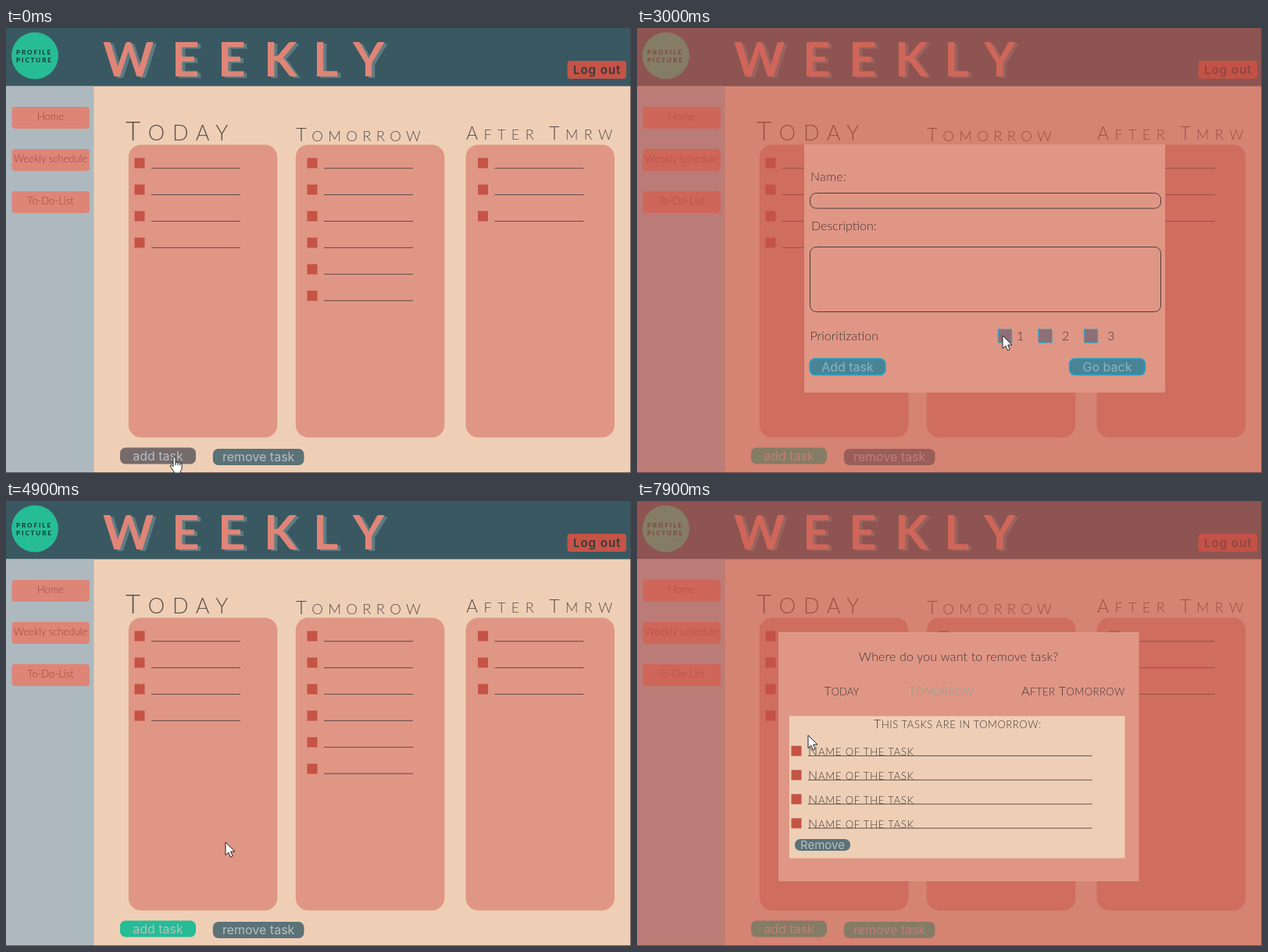
An HTML page that plays this animation: 800 px wide and 570 px high, repeating every 8 s.

```html
<!DOCTYPE html>
<html lang="en">
<head>
<meta charset="utf-8">
<title>Weekly planner</title>
<style>
  html, body { margin: 0; width: 100%; height: 100%; overflow: hidden; }
  svg { display: block; width: 100vw; height: 100vh; }
  text { font-family: Lato, "Open Sans", sans-serif; font-weight: 300; white-space: pre; }
  .ui { font-family: Inter, "Noto Sans", sans-serif; font-weight: 400; }
</style>
</head>
<body>
<svg id="stage" viewBox="0 0 800 570"></svg>
<script>
const LOOP = 8000;
const C = {
  header: '#3a5862', side: '#adb9be', peach: '#eecfb6', card: '#e09685', nav: '#dd8678',
  red: '#c55346', teal: '#5b7277', green: '#26bc95', ink: '#433a38', title: '#5d504b'
};

const attrs = o => Object.entries(o).map(([k, v]) => `${k}="${v}"`).join(' ');
const rect = (x, y, width, height, fill, more = {}) =>
  `<rect ${attrs({ x, y, width, height, fill, ...more })}/>`;
const text = (x, y, size, str, more = {}) =>
  `<text ${attrs({ x, y, 'font-size': size, fill: C.ink, ...more })}>${str}</text>`;
const line = (x1, x2, y) =>
  `<path d="M${x1} ${y}H${x2}" stroke="#4d4340" stroke-width=".9"/>`;
const square = (x, y, s = 13) => rect(x, y, s, s, C.red);

// Words starting with a capital get a large first letter, the rest are small capitals.
function caps(x, y, big, small, str, more = {}) {
  const body = str.replace(/([A-Z]?)([^A-Z]*)/g, (_, a, b) =>
    (a && `<tspan font-size="${big}">${a}</tspan>`) + b.toUpperCase());
  return text(x, y, small, body, more);
}

function button(id, x, y, w, h, label, size = 16) {
  return rect(x, y, w, h, C.teal, { id, rx: 7 }) +
    text(x + w / 2, y + h / 2 + size * .36, size, label,
      { class: 'ui', fill: '#b5bfc3', 'text-anchor': 'middle' });
}

function header() {
  const word = (dx, dy, fill) => text([124, 212, 271, 330, 393, 444].map(v => v + dx).join(' '),
    62 + dy, 62, 'WEEKLY', { fill, style: 'font-weight:700' });
  const badge = (y, s) => text(13, y, 8, s,
    { fill: '#19463f', style: 'font-weight:900', 'letter-spacing': 1.9 });
  return rect(0, 0, 800, 74.5, C.header) +
    `<circle cx="37" cy="35.5" r="30" fill="${C.green}"/>` +
    badge(33.5, 'PROFILE') + badge(43.5, 'PICTURE') +
    word(4, 2, '#5f7c83') + word(0, 0, '#df8577') +
    rect(718.5, 42, 75.5, 23, C.red, { rx: 4 }) +
    text(726, 58.5, 15, 'Log out',
      { class: 'ui', fill: '#38393f', style: 'font-weight:600', 'letter-spacing': 1 });
}

function sidebar() {
  return rect(0, 74.5, 112.5, 495.5, C.side) + ['Home', 'Weekly schedule', 'To-Do-List'].map((s, i) =>
    rect(7.5, 101 + 54 * i, 99.5, 28, C.nav, { rx: 4 }) +
    text(57, 118 + 54 * i, 13, s, { fill: '#9c443b', 'text-anchor': 'middle' })).join('');
}

function column(x, boxX, rows) {
  let out = rect(x, 149.5, 190.5, 375, C.card, { rx: 16 });
  for (let i = 0; i < rows; i++) {
    out += square(boxX, 166.5 + 34 * i) + line(boxX + 21.5, boxX + 135.5, 179.7 + 33.9 * i);
  }
  return out;
}

function page() {
  const title = (x, y, big, small, str, spacing) =>
    caps(x, y, big, small, str, { fill: C.title, 'letter-spacing': spacing });
  return rect(0, 0, 800, 570, C.peach) + header() + sidebar() +
    column(156.8, 164.5, 4) + column(370.8, 385.5, 6) + column(588.5, 604, 3) +
    title(153, 143.5, 33, 27, 'Today', 9.7) +
    title(371, 144.5, 24, 18.5, 'Tomorrow', 6.3) +
    title(589, 142.5, 23, 18, 'After Tmrw', 7.4) +
    button('add', 146, 537.5, 97, 21, 'add task') +
    button('remove', 264.8, 539, 116.7, 21, 'remove task');
}

function addDialog() {
  const field = (y, h) => rect(221.5, y, 449, h, 'none', { rx: 8, stroke: '#4a3f3d' });
  const boxes = [462.5, 514, 572.5];
  const glow = (x, y, w, h, more) => rect(x, y, w, h, '#29a5d2',
    { 'fill-opacity': .35, stroke: '#1fa6d0', 'stroke-width': 1.5, ...more });
  return rect(214, 149, 462, 318, C.card) +
    text(222, 196, 16, 'Name:', { 'letter-spacing': .3 }) + field(211.5, 19.5) +
    text(223, 259, 16, 'Description:') + field(280.5, 83) +
    text(221.5, 400, 16, 'Prioritization') +
    boxes.map((x, i) => square(x, 386, 17) + text([486, 544, 602][i], 400, 16, i + 1)).join('') +
    `<path id="check" d="M465 395l4 4.5l8-8.5" fill="none" stroke="#f3dcc4" stroke-width="2.6"/>` +
    button('confirm', 221, 423.5, 97, 21, 'Add task') +
    button('back', 553.5, 423.5, 97, 21, 'Go back') +
    `<g id="glow">${boxes.map(x => glow(x, 386, 17, 17, { 'stroke-dasharray': '2 1' })).join('')}` +
    glow(221, 423.5, 97, 21, { rx: 7 }) + glow(553.5, 423.5, 97, 21, { rx: 7 }) + '</g>';
}

function removeDialog() {
  let rows = '';
  for (let i = 0; i < 4; i++) {
    const y = 326 + 30.9 * i;
    rows += square(197.5, y - 12.4) + line(219, 582.5, y + .4) +
      caps(219, y, 16, 13, 'Name of the task', { 'letter-spacing': .85 });
  }
  return rect(181, 168, 461.5, 319, C.card) +
    text(411.5, 205, 16, 'Where do you want to remove task?',
      { 'text-anchor': 'middle', 'letter-spacing': .17 }) +
    caps(239.5, 249, 16, 13, 'Today') +
    caps(347.5, 249, 16, 13, 'Tomorrow', { id: 'pick', 'letter-spacing': .3 }) +
    caps(492, 249, 16, 13, 'After Tomorrow', { 'letter-spacing': .55 }) +
    `<g id="list">${rect(195, 275.5, 429.5, 182, C.peach)}` +
    caps(303, 291, 16, 13, 'This tasks are in tomorrow:', { 'letter-spacing': .6 }) +
    rows + button('drop', 202, 433, 71, 15, 'Remove', 15) + '</g>';
}

const arrow = `<path id="arrow" d="M0 0V16.5L3.8 13L6.3 19L9.2 17.8L6.7 12H12Z"
  fill="#fff" stroke="#222" stroke-linejoin="round"/>`;
const hand = `<path id="hand" d="M-2 2Q-2 .5-.5 .5T1 2V8Q2.5 6.5 4 8Q5.6 7 6.7 8.6Q9.2 8 9.2 10.5
  V14Q9.2 17 7.5 18.5V21H-1V19L-5.5 13Q-6.5 11.3-5 10.8Q-3.8 10.4-2 12.8Z
  M1 8V11M4 8V11M6.7 9V11.5" fill="#fff" stroke="#222" stroke-linejoin="round"/>`;

document.getElementById('stage').innerHTML = page() +
  `<g id="veil">${rect(0, 0, 800, 570, C.red, { 'fill-opacity': .6 })}</g>` +
  `<g id="addBox">${addDialog()}</g><g id="removeBox">${removeDialog()}</g>` +
  `<path d="M799.5 0V570M0 569.5H800" stroke="#4b4444" opacity=".8"/>` +
  `<g id="cursor">${arrow}${hand}</g>`;

const el = id => document.getElementById(id);
const show = (id, on) => el(id).setAttribute('visibility', on ? 'inherit' : 'hidden');
const clamp = v => Math.max(0, Math.min(1, v));
const within = (t, a, b) => t >= a && t < b;
const smooth = p => p * p * (3 - 2 * p);

function mix(a, b, p) {
  const part = (c, i) => parseInt(c.slice(i, i + 2), 16);
  return `rgb(${[1, 3, 5].map(i => Math.round(part(a, i) + (part(b, i) - part(a, i)) * p))})`;
}

// Rest colour, then a fade to red on hover, then green once pressed.
function press(id, t, hover, click) {
  const fill = t < click
    ? mix(C.teal, C.red, clamp((t - hover) / 220))
    : mix(C.red, C.green, clamp((t - click) / 150));
  el(id).setAttribute('fill', fill);
}

const path = [ // time, x, y
  [0, 216, 549], [700, 215, 550], [950, 215, 550], [1350, 400, 224], [1650, 646, 222],
  [2100, 480, 310], [2500, 500, 325], [2900, 468, 394], [3500, 468, 394], [4100, 281, 437],
  [4900, 281, 437], [5700, 304, 522], [5900, 306, 532], [6050, 308, 543], [6180, 308, 543],
  [6560, 429, 228], [6800, 424, 241], [7200, 424, 241], [7700, 219, 300], [8000, 219, 300]
];

function cursorAt(t) {
  const i = path.findIndex(k => k[0] > t);
  const [a, b] = [path[i - 1], path[i]];
  const p = smooth((t - a[0]) / (b[0] - a[0]));
  return [a[1] + (b[1] - a[1]) * p, a[2] + (b[2] - a[2]) * p];
}

const handTimes = [[0, 500], [3100, 3600], [3950, 4600], [5780, 6180], [6700, 7250]];

function draw(t) {
  const adding = within(t, 500, 4600), removing = t >= 6180;
  press('add', t, -55, 350);
  press('remove', t, 5740, 6030);
  press('confirm', t, 3950, 4250);
  show('veil', adding || removing);
  show('addBox', adding);
  show('removeBox', removing);
  show('check', adding && t >= 3300);
  show('glow', adding && within(t, 2650, 3200));
  el('glow').setAttribute('opacity', Math.min(clamp((t - 2650) / 100), clamp((3200 - t) / 200)));
  show('list', removing && t >= 7000);
  el('pick').setAttribute('fill', t >= 7000 ? '#84a396' : C.ink);

  const pointing = handTimes.some(([a, b]) => within(t, a, b));
  const [x, y] = cursorAt(t);
  el('cursor').setAttribute('transform', `translate(${x.toFixed(1)} ${y.toFixed(1)})`);
  show('hand', pointing);
  show('arrow', !pointing);
}

const start = performance.now();
function frame() {
  draw((performance.now() - start) % LOOP);
  requestAnimationFrame(frame);
}
frame();
</script>
</body>
</html>
```
